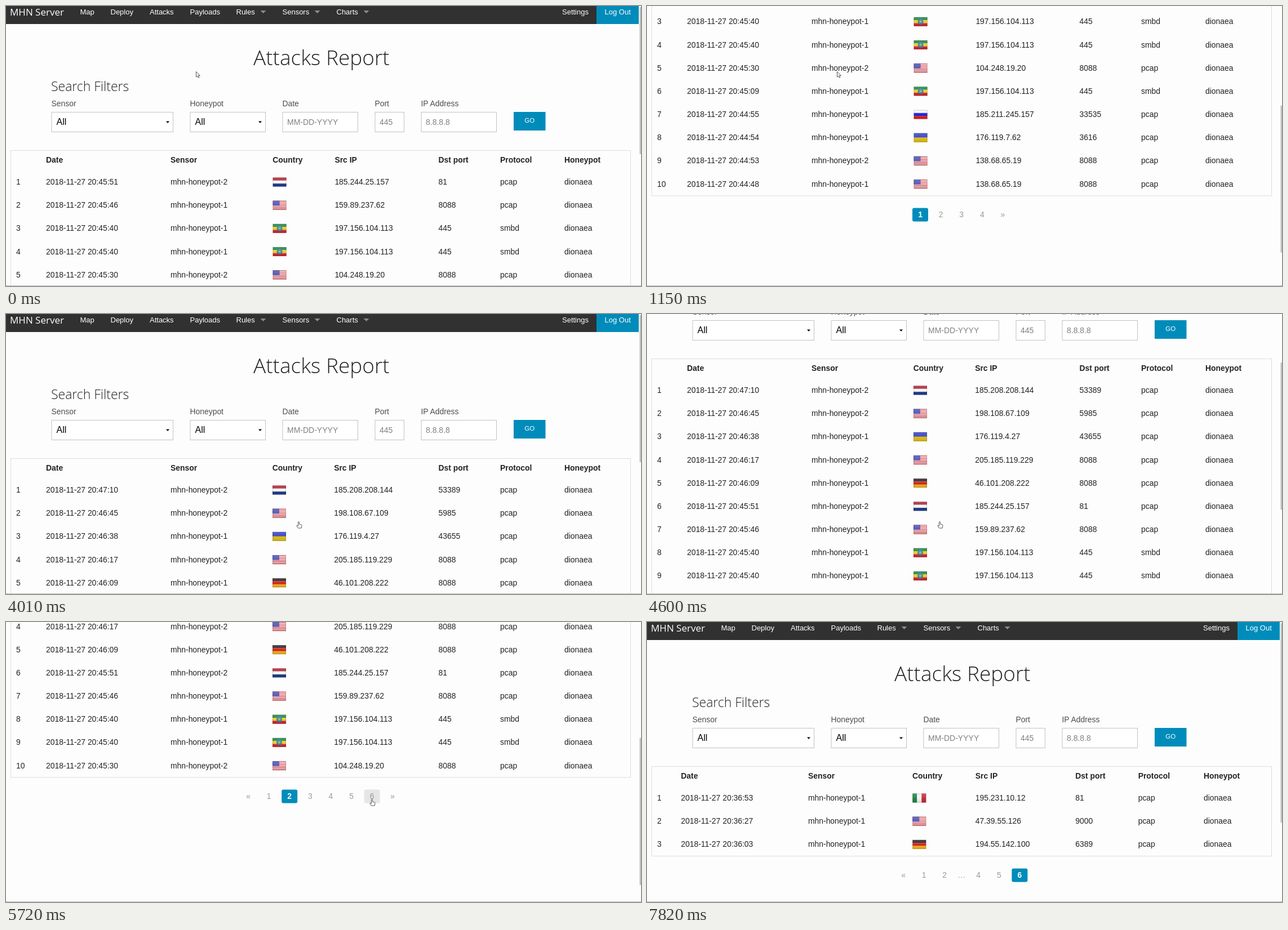
These frames come from a looping animation (1127 px wide and 497 px high, 9230 ms). An HTML page:

```html
<!DOCTYPE html>
<html lang="en">
<head>
<meta charset="utf-8">
<title>Attacks Report</title>
<style>
  html, body { margin: 0; width: 100%; height: 100%; overflow: hidden; background: #fdfdfd; }
  svg { display: block; font: 13.9px "Liberation Sans", Arial, sans-serif; fill: #222; }
  .open { font-family: "Open Sans", sans-serif; }
  .light { font-family: "Open Sans", sans-serif; font-weight: 300; }
  .nav { font-size: 13px; fill: #fff; }
  .label { fill: #4d4d4d; }
  .hint { fill: #808080; font-size: 14px; }
  .link { fill: #999; text-anchor: middle; }
  .current { fill: #fff; font-weight: bold; text-anchor: middle; }
</style>
</head>
<body>
<svg id="stage" width="1127" height="497" viewBox="0 0 1127 497"></svg>
<script>
const DURATION = 9230, ROW = 41.17, BLUE = '#008cba';

const text = (x, y, content, attrs = '') => `<text x="${x}" y="${y}" ${attrs}>${content}</text>`;
const rect = (x, y, w, h, fill, attrs = '') =>
  `<rect x="${x}" y="${y}" width="${w}" height="${h}" fill="${fill}" ${attrs}/>`;
const path = (d, fill, attrs = '') => `<path d="${d}" fill="${fill}" ${attrs}/>`;

// Flags are 24 x 16, drawn around the top left corner.
const rows = (...colors) =>
  colors.map((c, i) => rect(0, i * 16 / colors.length, 24, 16 / colors.length, c)).join('');
const columns = (...colors) =>
  colors.map((c, i) => rect(i * 24 / colors.length, 0, 24 / colors.length, 16, c)).join('');
const stripes = Array.from({ length: 13 }, (_, i) => i % 2 ? '#f8e8e8' : '#d83a44');
const flags = {
  nl: rows('#ad2836', '#f4f4f4', '#233f8c'),
  us: rows(...stripes) + rect(0, 0, 12, 8.6, '#4148ac') +
    path('M1 2h11M2 4.5h10M1 7h11', 'none', 'stroke="#fff" stroke-opacity=".4" stroke-dasharray="1 1"'),
  et: rows('#218544', '#f0cd22', '#d02a34') + '<circle cx="12" cy="8" r="5" fill="#3484ae"/>' +
    path('M12 4.5l1 2.5h2.5l-2 1.6.8 2.4-2.3-1.4-2.3 1.4.8-2.4-2-1.6H11z', '#a9b968'),
  ru: rows('#f6f6f6', '#1f22dc', '#e01f22'),
  ua: rows('#3a43c4', '#e0c014'),
  de: rows('#2a2626', '#d8231f', '#f0b51c'),
  it: columns('#23854a', '#f4f4f4', '#c4303b')
};
const flag = (code, x, y) => `<g transform="translate(${x} ${y})">${flags[code]}
  ${rect(0, 0, 24, 16, 'url(#gloss)')}
  ${rect(.4, .4, 23.2, 15.2, 'none', 'stroke="#000" stroke-opacity=".2" stroke-width=".8"')}</g>`;

// Attack: minute:second, honeypot number, country, source address, destination port
const pages = [
  {
    columns: [71, 292, 473.3, 583.4, 767.5, 877, 991],
    links: '1 2 3 4 »', first: 485, current: '1', thumb: 261,
    attacks: `45:51 2 nl 185.244.25.157 81
      45:46 1 us 159.89.237.62 8088
      45:40 1 et 197.156.104.113 445
      45:40 1 et 197.156.104.113 445
      45:30 2 us 104.248.19.20 8088
      45:09 1 et 197.156.104.113 445
      44:55 1 ru 185.211.245.157 33535
      44:54 1 ua 176.119.7.62 3616
      44:53 2 us 138.68.65.19 8088
      44:48 1 us 138.68.65.19 8088`
  },
  {
    columns: [71, 292, 472.7, 582.2, 767.5, 877, 991],
    links: '« 1 2 3 4 5 6 »', first: 430, current: '2', thumb: 261,
    attacks: `47:10 2 nl 185.208.208.144 53389
      46:45 2 us 198.108.67.109 5985
      46:38 1 ua 176.119.4.27 43655
      46:17 2 us 205.185.119.229 8088
      46:09 1 de 46.101.208.222 8088
      45:51 2 nl 185.244.25.157 81
      45:46 1 us 159.89.237.62 8088
      45:40 1 et 197.156.104.113 445
      45:40 1 et 197.156.104.113 445
      45:30 2 us 104.248.19.20 8088`
  },
  {
    columns: [60.3, 286, 471, 582.8, 760.3, 871.7, 988],
    links: '« 1 2 … 4 5 6', first: 455, current: '6', thumb: 354,
    attacks: `36:53 1 it 195.231.10.12 81
      36:27 1 us 47.39.55.126 9000
      36:03 1 de 194.55.142.100 6389`
  }
];

function header() {
  const menu = [['Map', 131.5], ['Deploy', 185.5], ['Attacks', 255], ['Payloads', 326.5],
    ['Rules', 408.5], ['Sensors', 490.5], ['Charts', 586.5], ['Settings', 987], ['Log Out', 1062.5]];
  const fields = [['Sensor', 81, 216], ['Honeypot', 327, 134], ['Date', 491, 134, 'MM-DD-YYYY'],
    ['Port', 655, 52, '445'], ['IP Address', 737, 134, '8.8.8.8']];
  return rect(0, 0, 1123, 32, '#313131') + rect(1048, 0, 75, 32, BLUE) +
    text(7, 17, 'MHN Server', 'class="open" font-size="17" fill="#fff"') +
    menu.map(([name, x]) => text(x, 14.5, name, 'class="nav"')).join('') +
    [456.5, 552.5, 639.5].map(x => path(`M${x - 5} 8h10l-5 5z`, '#8b8b8b')).join('') +
    text(439, 105, 'Attacks Report', 'class="light" font-size="37"') +
    text(80, 151, 'Search Filters', 'class="light" font-size="23"') +
    fields.map(([name, x, w, hint]) => text(x - .5, 178, name, 'class="label"') +
      rect(x, 188.5, w - .5, 35, '#fff', 'stroke="#c2c2c2"') +
      (hint ? text(x + 8, 211, hint, 'class="hint"')
        : text(x + 8.5, 211, 'All', 'font-size="16" fill="#000"') +
          path(`M${x + w - 13} 204.5h6l-3 3.5z`, '#000'))).join('') +
    rect(901, 188, 56.5, 33, BLUE) +
    text(929.3, 207.4, 'GO', 'font-size="11.5" fill="#fff" text-anchor="middle"');
}

function report({ columns, attacks, links, first, current }) {
  const titles = ['Date', 'Sensor', 'Country', 'Src IP', 'Dst port', 'Protocol', 'Honeypot'];
  const list = attacks.split('\n').map(line => line.trim().split(' '));
  const bottom = 292.1 + list.length * ROW;
  let out = rect(8.5, 256.5, 1100, bottom - 256.5, 'none', 'stroke="#ddd"') +
    titles.map((title, i) => text(columns[i], 278, title, 'font-weight="bold"')).join('');
  list.forEach(([time, pot, country, ip, port], i) => {
    const y = 317 + i * ROW;
    const cells = ['2018-11-27 20:' + time, 'mhn-honeypot-' + pot, '', ip, port,
      port === '445' ? 'smbd' : 'pcap', 'dionaea'];
    out += text(18, y, i + 1) + flag(country, columns[2] + .3, y - 12.5) +
      cells.map((cell, c) => cell && text(columns[c], y, cell)).join('');
  });
  let x = first;
  links.split(' ').forEach(link => {
    if (link === '…') x -= 6.6;
    const active = link === current;
    out += rect(x - 14, bottom + 21.8, 28, 24, active ? BLUE : '#e6e6e6',
      `rx="3" ${active ? '' : `data-link="${link}" visibility="hidden"`}`) +
      text(x, bottom + 38.4, link, `class="${active ? 'current' : 'link'}"`);
    x += link === '…' ? 30 : 36.6;
  });
  return out;
}

const outline = 'stroke="#444" stroke-width=".9" stroke-linejoin="round"';
const pointers = {
  arrow: path('M.5.5v9.6l2.2-2 1.7 3.4 1.5-.8-1.6-3.2h3z', '#fff', outline),
  hand: path('M-1 1q1-1.3 2 0v4l3.6.9q1 .4.9 1.8l-.8 4.3H-1L-3.8 7.8q.8-1.4 1.8-.4l1 1z', '#fff', outline),
  beam: path('M-2.5-7H-.5L0-6.5.5-7h2M0-6.5v13M-2.5 7H-.5L0 6.5.5 7h2', 'none', 'stroke="#555"')
};

// time, page, scroll offset
const views = [[0, 0, 0], [390, 0, 35], [560, 0, 105], [690, 0, 184.6], [830, 0, 316],
  [1010, 0, 364], [1150, 0, 367], [1300, 0, 368.6], [4010, 1, 0], [4450, 1, 24], [4600, 1, 177],
  [4720, 1, 245], [4840, 1, 325], [5030, 1, 428], [6590, 2, 0]];
// time, pointer, x, y, hovered link
const moves = [[0, 'arrow', 337, 116], [1450, 'arrow', 549, 246], [1610, 'arrow', 563, 300],
  [1750, 'arrow', 557, 336], [1880, 'arrow', 541, 368], [2000, 'arrow', 531, 383],
  [2150, 'hand', 522, 371, '2'], [2270, 'hand', 519.5, 368, '2'], [4010, 'hand', 519.5, 368],
  [5290, 'arrow', 622, 339], [5570, 'hand', 654, 318, '6'], [5720, 'hand', 649.5, 314, '6'],
  [6590, 'hand', 649.5, 314], [6720, 'arrow', 623, 301], [6870, 'beam', 627, 307],
  [7400, 'arrow', 1088, 432], [7540, 'arrow', 1076, 450], [7690, 'arrow', 1076, 478], [7820, '', 0, 0]];

const stage = document.getElementById('stage');
stage.innerHTML = `<defs><linearGradient id="gloss" x2="0" y2="1">
  <stop stop-color="#fff" stop-opacity=".16"/><stop offset=".5" stop-color="#fff" stop-opacity=".04"/>
  <stop offset=".5" stop-color="#000" stop-opacity="0"/><stop offset="1" stop-color="#000" stop-opacity=".1"/>
  </linearGradient></defs>
  <g id="content">${header()}${pages.map(page => `<g class="page">${report(page)}</g>`).join('')}</g>
  ${rect(1124.5, 2, 2.5, 261, '#c1c1c1', 'id="thumb"')}
  ${rect(0, 496, 1127, 1, '#b9b9b9')}
  <g id="pointer">${Object.keys(pointers).map(k => `<g data-kind="${k}">${pointers[k]}</g>`).join('')}</g>`;

const find = id => document.getElementById(id);
const content = find('content'), thumb = find('thumb'), pointer = find('pointer');
const groups = [...stage.querySelectorAll('.page')];
const links = [...stage.querySelectorAll('[data-link]')];
const latest = (list, t) => list.filter(([start]) => start <= t).pop();

function draw(now) {
  const t = now % DURATION;
  const [, page, scroll] = latest(views, t);
  const [, kind, x, y, hover] = latest(moves, t);
  content.setAttribute('transform', `translate(0 ${-scroll})`);
  groups.forEach((group, i) => group.style.display = i === page ? '' : 'none');
  links.forEach(link => link.setAttribute('visibility', link.dataset.link === hover ? 'visible' : 'hidden'));
  thumb.setAttribute('y', 2 + scroll * .476);
  thumb.setAttribute('height', pages[page].thumb);
  pointer.setAttribute('transform', `translate(${x} ${y})`);
  for (const shape of pointer.children) shape.style.display = shape.dataset.kind === kind ? '' : 'none';
  requestAnimationFrame(draw);
}
draw(performance.now());
</script>
</body>
</html>
```
